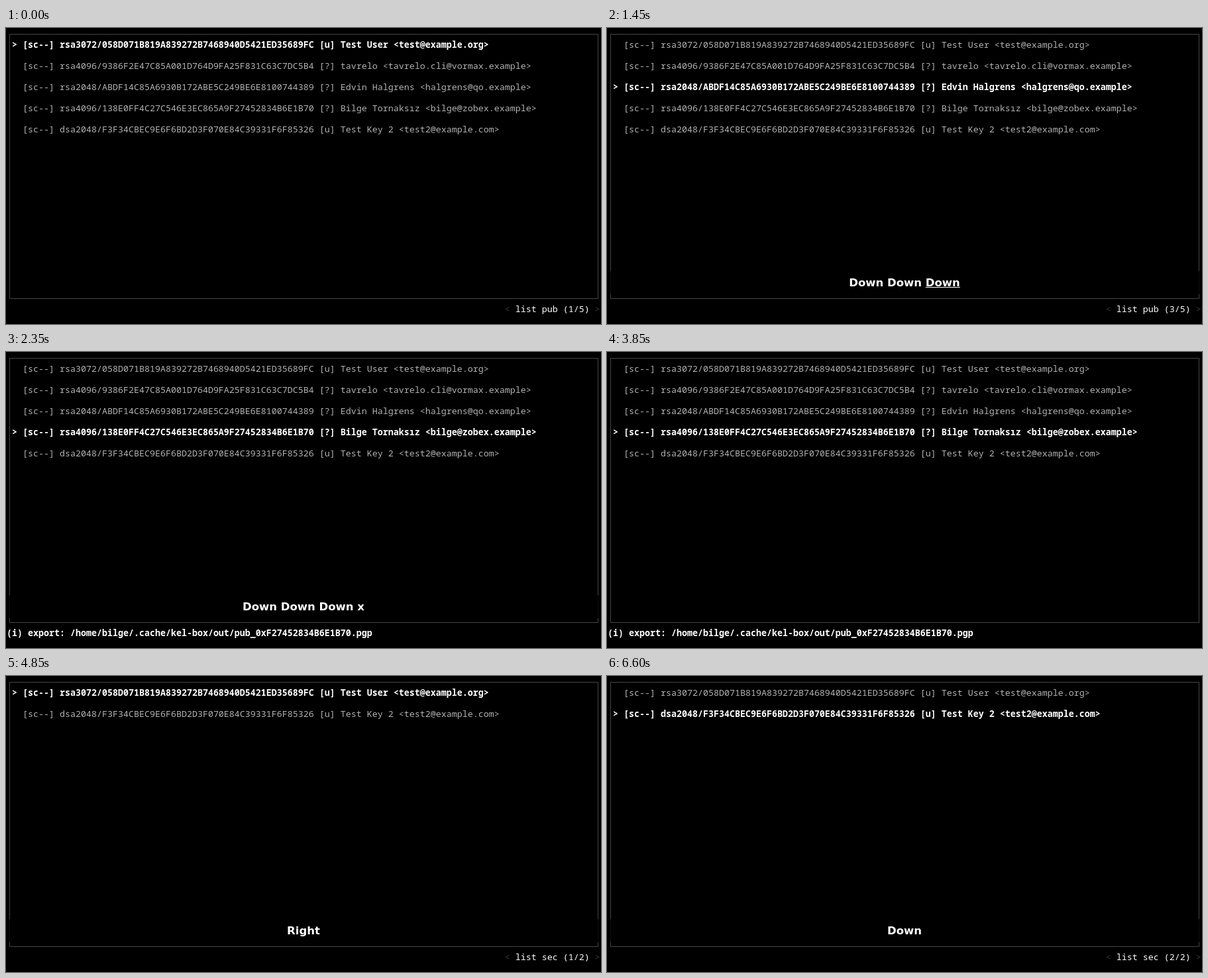
An HTML page that plays this animation: 898x448 px, repeating every 8000 ms.

```html
<!DOCTYPE html>
<html lang="en">
<head>
<meta charset="utf-8">
<title>Key list</title>
<style>
html, body { margin: 0; width: 100%; height: 100%; overflow: hidden; background: #000; }
#stage {
  position: relative; width: 898px; height: 448px; overflow: hidden; background: #000;
  font: 13.3333px/16px "Noto Sans Mono", "DejaVu Sans Mono", monospace;
  color: #b2b2b2; white-space: pre; font-variant-ligatures: none;
}
#stage div { position: absolute; }
#frame { left: 5px; top: 9px; width: 887px; height: 399px; border: 1px solid #444; }
#list { left: 1px; top: 17px; }
.row { left: 0; height: 16px; }
.on { color: #fff; font-weight: 700; }
#status { left: 1px; top: 417px; color: #fff; }
#status i { font-style: normal; color: #3c3c3c; }
#keys {
  left: 0; top: 368px; width: 898px; height: 35px; background: rgba(0, 0, 0, .8);
  font: 700 16.5px/35px "DejaVu Sans", sans-serif; color: #fff; text-align: center;
}
#keys u { text-decoration: underline 1px; text-underline-offset: 1px; text-decoration-skip-ink: none; }
</style>
</head>
<body>
<div id="stage">
  <div id="frame"></div>
  <div id="list"></div>
  <div id="keys"></div>
  <div id="status"></div>
</div>
<script>
const LOOP = 8000;
const $ = id => document.getElementById(id);
const esc = s => s.replace(/</g, '&lt;').replace(/>/g, '&gt;');

const user = 'rsa3072/058D071B819A839272B7468940D5421ED35689FC [u] Test User <test@example.org>';
const second = 'dsa2048/F3F34CBEC9E6F6BD2D3F070E84C39331F6F85326 [u] Test Key 2 <test2@example.com>';
const lists = {
  pub: [
    user,
    'rsa4096/9386F2E47C85A001D764D9FA25F831C63C7DC5B4 [?] tavrelo <tavrelo.cli@vormax.example>',
    'rsa2048/ABDF14C85A6930B172ABE5C249BE6E8100744389 [?] Edvin Halgrens <halgrens@qo.example>',
    'rsa4096/138E0FF4C27C546E3EC865A9F27452834B6E1B70 [?] Bilge Tornaksız <bilge@zobex.example>',
    second
  ],
  sec: [user, second]
};
const exported = '(i) export: /home/bilge/.cache/kel-box/out/pub_0xF27452834B6E1B70.pgp';

// Each cue changes part of the state; "fresh" underlines the latest key.
const start = { list: 'pub', row: 0, keys: '', fresh: false, note: '' };
const cues = [
  [950, { row: 1, keys: 'Down', fresh: true }],
  [1150, { fresh: false }],
  [1200, { keys: 'Down Down', fresh: true }],
  [1250, { row: 2 }],
  [1400, { fresh: false }],
  [1450, { keys: 'Down Down Down', fresh: true }],
  [1500, { row: 3 }],
  [1650, { fresh: false }],
  [2150, { keys: 'Down Down Down x', fresh: true }],
  [2200, { note: exported }],
  [2350, { fresh: false }],
  [3850, { keys: '' }],
  [4100, { note: '' }],
  [4650, { list: 'sec', row: 0, keys: 'Right', fresh: true }],
  [4850, { fresh: false }],
  [6350, { keys: '' }],
  [6400, { keys: 'Down', fresh: true }],
  [6450, { row: 1 }],
  [6600, { fresh: false }]
];

function draw({ list, row, keys, fresh, note }) {
  const items = lists[list];
  $('list').innerHTML = items.map((text, i) => {
    const on = i === row;
    return `<div class="row${on ? ' on' : ''}" style="top:${32 * i}px">` +
      esc(`${on ? '> ' : '  '} [sc--] ${text}`).replace(/^/, on ? '' : '') + '</div>';
  }).join('').replace(/(px">)/g, '$1 ').replace(/ {4}\[/g, '   [').replace(/ &gt;  ?\[sc/g, ' &gt; [sc');
  $('keys').hidden = !keys;
  $('keys').innerHTML = fresh ? keys.replace(/\S+$/, '<u>$&</u>') : keys;
  $('status').innerHTML = note ? `<b>${note}</b>` :
    ' '.repeat(94) + `<i>&lt;</i> list ${list} (${row + 1}/${items.length}) <i>&gt;</i>`;
}

let shown = -1;
function tick() {
  const t = performance.now() % LOOP;
  const past = cues.filter(([at]) => at <= t);
  if (past.length !== shown) {
    shown = past.length;
    draw(Object.assign({}, start, ...past.map(cue => cue[1])));
  }
  requestAnimationFrame(tick);
}
tick();
</script>
</body>
</html>
```
